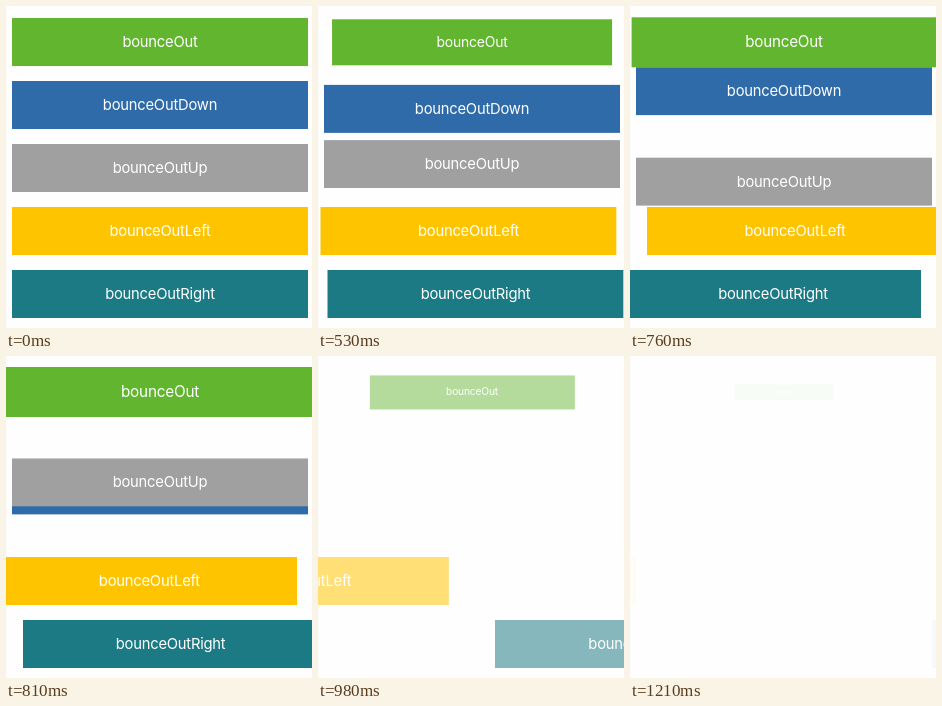
Animation of 306x322 px, one loop 2010 ms. Source, as an HTML page:

```html
<!DOCTYPE html>
<html lang="en">
<head>
<meta charset="utf-8">
<title>Bounce exits</title>
<style>
  html, body { margin: 0; width: 100%; height: 100%; overflow: hidden; background: #fefefe; }
  body { position: relative; }
  div {
    position: absolute; left: 6px; width: 296px; height: 48px;
    color: #fff; text-align: center; white-space: nowrap;
    font: 14.75px/48px Inter, Roboto, sans-serif; letter-spacing: -.015em;
  }
</style>
</head>
<body>
<script>
const LOOP = 2010, START = 350, TICK = 57.2, LAST = 15;
const tracks = [];

// Keys are [step, properties]; each segment eases on its own.
function addTrack(el, keys) {
  const duration = keys[keys.length - 1][0];
  const frames = keys.map(([step, props]) => ({ ...props, offset: step / duration, easing: 'ease' }));
  const track = el.animate(frames, { duration, fill: 'both' });
  track.pause();
  tracks.push(track);
}

const scale = s => ({ transform: `scale(${s})` });
const pop = [[0, scale(1)], [.4, scale(1)], [4.5, scale(.94)], [8.55, scale(1.04)], [17.3, scale(.3)]];
const fade = start => [[0, { opacity: 1 }], [start, { opacity: 1 }], [17.1, { opacity: 0 }]];

// Small nudge outwards, a larger one back, then off in direction (dx, dy).
function leave(dx, dy) {
  const [nudge, back, exit] = dx ? [3.6, -11, 331] : [4, -13.7, 765];
  const at = d => ({ transform: `translate(${dx * d}px, ${dy * d}px)` });
  return [[0, at(0)], [.4, at(0)], [3.7, at(nudge)], [7, at(back)], [19.9, at(exit)]];
}

// Label, colour, motion, step at which the fade begins.
const bars = [
  ['bounceOut', '#62b52e', pop, 8.3],
  ['bounceOutDown', '#2f6ba8', leave(0, 1), 8],
  ['bounceOutUp', '#a0a0a0', leave(0, -1), 8],
  ['bounceOutLeft', '#ffc400', leave(-1, 0), 8.7],
  ['bounceOutRight', '#1c7a85', leave(1, 0), 8.7]
];

bars.forEach(([label, color, move, fadeStart], i) => {
  const el = document.createElement('div');
  el.textContent = label;
  el.style.background = color;
  el.style.top = 12 + 63 * i + 'px';
  document.body.append(el);
  addTrack(el, move);
  addTrack(el, fade(fadeStart));
});

// The motion advances in ticks, aligned to hundredths of a second.
function draw(now) {
  const t = Math.floor((now % LOOP - START) / 10) * 10;
  const step = Math.min(LAST, Math.max(0, Math.floor(t / TICK)));
  for (const track of tracks) track.currentTime = step;
}

const origin = performance.now();
function loop() {
  draw(performance.now() - origin);
  requestAnimationFrame(loop);
}
loop();
</script>
</body>
</html>
```
